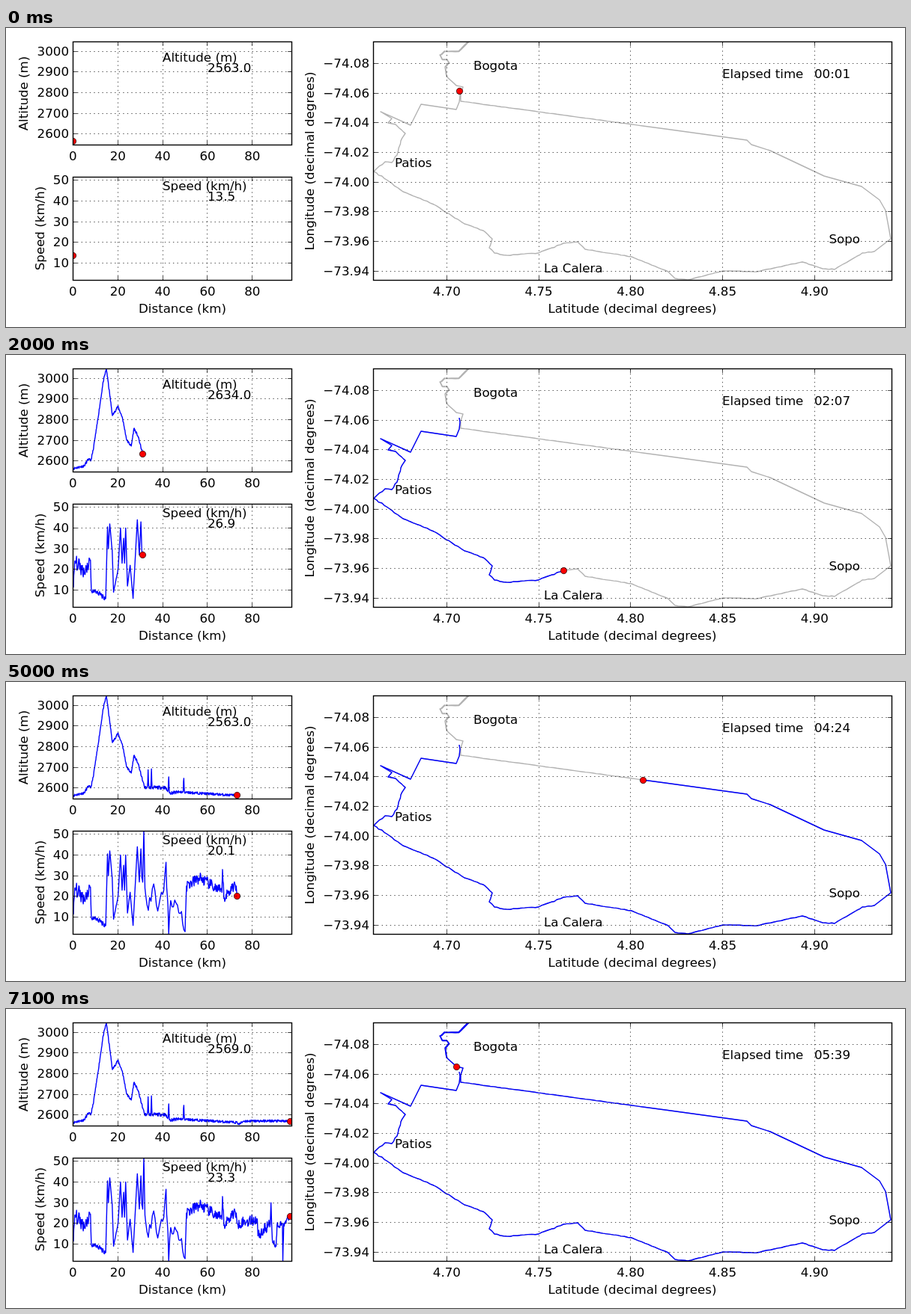
These frames come from a looping animation (1200 by 400 pixels, 7200 ms). An HTML page:

```html
<!DOCTYPE html>
<html lang="en">
<head>
<meta charset="utf-8">
<title>Ride log</title>
<style>
  html, body { margin: 0; width: 100%; height: 100%; overflow: hidden; background: #fff; }
  svg { display: block; width: 1200px; height: 400px; }
  text { font: 16.667px "DejaVu Sans", sans-serif; fill: #000; white-space: pre; }
  .line { fill: none; stroke: #00f; stroke-width: 1.39; stroke-linejoin: round; }
  .ghost { stroke: #b2b2b2; }
  .grid { stroke: #000; stroke-width: .69; stroke-dasharray: 1.39 4.17; }
  .tick { stroke: #000; stroke-width: .69; }
  .spine { fill: none; stroke: #000; stroke-width: 1.39; }
  .dot { fill: #f00; stroke: #000; stroke-width: .69; }
</style>
</head>
<body>
<svg id="stage" viewBox="0 0 1200 400"></svg>
<script>
const STEP = 100, STEPS = 72;
const stage = document.getElementById('stage');

function add(tag, attrs, parent = stage) {
  const node = document.createElementNS('http://www.w3.org/2000/svg', tag);
  for (const key in attrs) node.setAttribute(key, attrs[key]);
  parent.appendChild(node);
  return node;
}

function label(text, x, y, anchor = 'start', turned = false) {
  const attrs = { x, y, 'text-anchor': anchor };
  if (turned) attrs.transform = `rotate(-90 ${x} ${y})`;
  const node = add('text', attrs);
  node.textContent = text;
  return node;
}

let seed = 11;
function noise(size) {
  seed = (seed * 16807) % 2147483647;
  return (seed / 1073741823.5 - 1) * size;
}

const pairs = flat => flat.reduce((out, v, i) => (i % 2 ? out[out.length - 1].push(v) : out.push([v]), out), []);
const mix = (a, b, t) => a.map((v, i) => v + (b[i] - v) * t);

// Rows are sorted by their first column
function sample(rows, key) {
  let i = 1;
  while (i < rows.length - 1 && rows[i][0] < key) i++;
  const a = rows[i - 1], b = rows[i];
  return mix(a, b, Math.min(1, Math.max(0, (key - a[0]) / (b[0] - a[0] || 1))));
}

const kmX = km => 89.4 + km * 2.993;
const altY = m => 31.4 + (3000 - m) * .2758;
const speedY = v => 203.7 + (50 - v) * 2.772;

// Route legs: distance reached at the end, roughness, corner points
const westLegs = [
  [10.5, 0, [605,84, 606,90, 605,99, 601,109, 554,102, 540,130, 500,112, 515,121, 510,127, 520,129, 525,134]],
  [14.9, .9, [533,141, 527,151, 522,170, 515,180, 506,179, 491,192]],
  [31.1, .6, [508,203, 530,219, 571,236, 612,262, 637,271, 649,282, 645,294, 652,301, 668,304, 711,301, 744,288]]
];
const eastLegs = [
  [48.4, .3, [763,286, 773,296, 835,306, 884,326, 893,335, 910,337, 957,325, 1002,326, 1063,313, 1090,322]],
  [53.3, .5, [1106,323, 1143,301, 1159,299]],
  [73.2, 0, [1181,282, 1174,244, 1166,230, 1142,212, 1092,198, 1020,164, 995,156, 989,150, 880,135, 850,131]]
];
const townRoad = [601,77, 588,65, 586,52, 591,46, 588,42, 582,42, 579,36, 581,35];
const cityRoad = [585,31, 604,31, 617,18, 621,11];
const back = flat => pairs(flat).reverse().map(([x, y]) => [x + .7, y + .5]).flat();
const northLegs = [
  [88.9, .2, [740,116, 607,98, 607,88, 610,79, ...townRoad]],
  [96.9, .2, [...cityRoad, ...back(cityRoad), ...back(townRoad)]]
];

function roughen(points, size) {
  const out = [points[0]];
  for (let i = 1; i < points.length; i++) {
    const a = points[i - 1], b = points[i];
    const n = size ? Math.ceil(Math.hypot(b[0] - a[0], b[1] - a[1]) / 5) : 1;
    for (let j = 1; j < n; j++) {
      const [x, y] = mix(a, b, j / n);
      out.push([x + noise(size), y + noise(size)]);
    }
    out.push(b);
  }
  return out;
}

function buildRoute() {
  const rows = [];
  let startKm = 0, last = null;
  for (const [endKm, size, flat] of [...westLegs, ...eastLegs, ...northLegs]) {
    const points = roughen(last ? [last, ...pairs(flat)] : pairs(flat), size);
    const along = [0];
    for (let i = 1; i < points.length; i++) {
      const [ax, ay] = points[i - 1], [bx, by] = points[i];
      along.push(along[i - 1] + Math.hypot((bx - ax) / 22.07, (by - ay) / 17.9));
    }
    const total = along[along.length - 1];
    points.forEach((p, i) => rows.push([startKm + (endKm - startKm) * along[i] / total, ...p]));
    last = points[points.length - 1];
    startKm = endKm;
  }
  return rows;
}

// Profiles: noise size, spacing in km, then distance and value in turn
const altitudeParts = [
  [6, .15, [0,2563, 5,2576, 6.8,2608, 8,2602, 9,2652, 10.5,2758, 13.5,2985, 14.9,3048, 17.6,2820, 20,2865,
    22,2812, 24,2700, 26,2672, 27.2,2758, 29,2720, 31.1,2634, 32,2602]],
  [8, .15, [41,2602, 43,2576, 48.4,2580]],
  [6, .15, [73.2,2563, 74,2554, 76,2570, 88.9,2571, 96.9,2569]]
];
const spikes = [33.5, 35, 42.7, 49.4];
const spikeHeight = km => spikes.reduce((sum, at) => sum + 85 * Math.max(0, 1 - Math.abs(km - at) / .25), 0);

const speedParts = [
  [3.5, .2, [0,13.5, .2,11.5, .8,24, 5,19, 7.8,24.5]],
  [1.2, .2, [8.2,9.5, 10.5,9.3, 14.6,6]],
  [.4, .3, [15.4,40.5, 15.8,30, 16.4,42, 17.5,29, 18.1,9, 20.1,20, 21.2,40, 21.9,23, 22.6,35, 23,23, 23.5,40,
    24.3,12, 25.5,22, 26.8,6, 28.7,44, 29.6,27, 30.3,43, 30.7,29, 31.1,26.9, 31.6,52, 32.1,24, 33,16]],
  [5, .6, [36,26, 37.8,13, 40,21, 41.5,36.5, 42.1,20, 42.7,2, 43.6,18, 48.4,12.7, 50,3]],
  [2.8, .2, [50.6,25, 56.6,29, 66.4,22, 66.7,33, 67.3,19, 72.2,26, 73.2,20.1, 82.2,22, 82.5,14, 88,20]],
  [1.6, .2, [88.3,30, 88.9,12.1, 90.6,9, 91,19, 93.4,20, 93.6,2, 94,20, 96.9,23.3]]
];

function buildProfile(parts, toY, extra = () => 0) {
  const rows = [];
  for (const [size, gap, flat] of parts) {
    for (const [km, value] of pairs(flat)) {
      const last = rows[rows.length - 1];
      const n = last ? Math.ceil((km - last[0]) / gap) : 0;
      for (let j = 1; j < n; j++) {
        const [k, v] = mix(last, [km, value], j / n);
        rows.push([k, v + noise(size) + extra(k)]);
      }
      rows.push([km, value]);
    }
  }
  return rows.map(([km, value]) => [km, kmX(km), toY(value), value]);
}

// Step, distance in km, elapsed minutes
const schedule = [
  [0, 0, 1], [4, 8.1, 27], [7, 10.5, 46], [12, 14.6, 77], [16, 25.2, 102], [20, 31.1, 127],
  [29, 48.4, 189], [32, 53.3, 200], [50, 73.2, 264], [64, 88.9, 312], [71, 96.9, 339]
];

const toPath = rows => 'M' + rows.map(r => r[1].toFixed(2) + ' ' + r[2].toFixed(2)).join('L');

function track(rows, [l, t, r, b], ghost) {
  const id = 'clip' + Math.floor(l) + '-' + Math.floor(t);
  add('rect', { x: l, y: t, width: r - l, height: b - t }, add('clipPath', { id }));
  const group = add('g', { 'clip-path': `url(#${id})` });
  if (ghost) add('path', { class: 'line ghost', d: toPath(rows) }, group);
  const line = add('path', { class: 'line' }, group);
  const dot = add('circle', { class: 'dot', r: 4.17 }, group);
  return km => {
    const now = sample(rows, km);
    line.setAttribute('d', toPath([...rows.filter(row => row[0] < km), now]));
    dot.setAttribute('cx', Math.floor(now[1]) + .5);
    dot.setAttribute('cy', Math.floor(now[2]) + .5);
    return now[3];
  };
}

const segment = (cls, x1, y1, x2, y2) => add('line', { class: cls, x1, y1, x2, y2 });
const snap = v => Math.floor(v) + .5;

function axes([l, t, r, b], xTicks, yTicks) {
  for (const [text, pos] of xTicks) {
    const x = snap(pos);
    if (x > l) segment('grid', x, b, x, t);
    segment('tick', x, b, x, b - 5.56);
    segment('tick', x, t, x, t + 5.56);
    label(text, pos, b + 20, 'middle');
  }
  for (const [text, pos] of yTicks) {
    const y = snap(pos);
    segment('grid', l, y, r, y);
    segment('tick', l, y, l + 5.56, y);
    segment('tick', r, y, r - 5.56, y);
    label(text, l - 5.5, pos + 5.5, 'end');
  }
  add('rect', { class: 'spine', x: l, y: t, width: r - l, height: b - t });
}

const range = (n, make) => Array.from({ length: n }, (_, i) => make(i));
const altBox = [89.5, 18.5, 381.5, 156.5];
const speedBox = [89.5, 199.5, 381.5, 337.5];
const mapBox = [490.5, 18.5, 1182.5, 337.5];

const showAltitude = track(buildProfile(altitudeParts, altY, spikeHeight), altBox);
const showSpeed = track(buildProfile(speedParts, speedY), speedBox);
const showRoute = track(buildRoute(), mapBox, true);

const kmTicks = range(5, i => [i * 20, kmX(i * 20)]);
axes(altBox, kmTicks, range(5, i => [2600 + i * 100, altY(2600 + i * 100)]));
axes(speedBox, kmTicks, range(5, i => [10 + i * 10, speedY(10 + i * 10)]));
axes(mapBox,
  range(5, i => [(4.7 + i * .05).toFixed(2), 588.4 + i * 122.7]),
  range(8, i => ['\u2212' + (74.08 - i * .02).toFixed(2), 47.4 + i * 39.7]));

label('Distance (km)', 235.5, 381, 'middle');
label('Latitude (decimal degrees)', 836, 381, 'middle');
label('Altitude (m)', 29, 87.5, 'middle', true);
label('Speed (km/h)', 51, 268, 'middle', true);
label('Longitude (decimal degrees)', 411, 178, 'middle', true);
label('Altitude (m)', 209, 45);
label('Speed (km/h)', 209, 217);
label('Elapsed time', 956, 67);
label('Bogota', 624, 56);
label('Patios', 519, 186);
label('La Calera', 718, 327);
label('Sopo', 1098.5, 287.5);

const altitudeText = label('', 269, 59);
const speedText = label('', 269, 231);
const timeText = label('', 1079, 67);

const two = n => String(n).padStart(2, '0');
let shown = -1;

function render(step) {
  const [, km, minutes] = sample(schedule, step);
  const m = Math.round(minutes);
  altitudeText.textContent = Math.round(showAltitude(km)) + '.0';
  speedText.textContent = showSpeed(km).toFixed(1);
  timeText.textContent = two(Math.floor(m / 60)) + ':' + two(m % 60);
  showRoute(km);
}

function tick() {
  const step = Math.floor(performance.now() / STEP) % STEPS;
  if (step !== shown) render(shown = step);
  requestAnimationFrame(tick);
}
tick();
</script>
</body>
</html>
```
